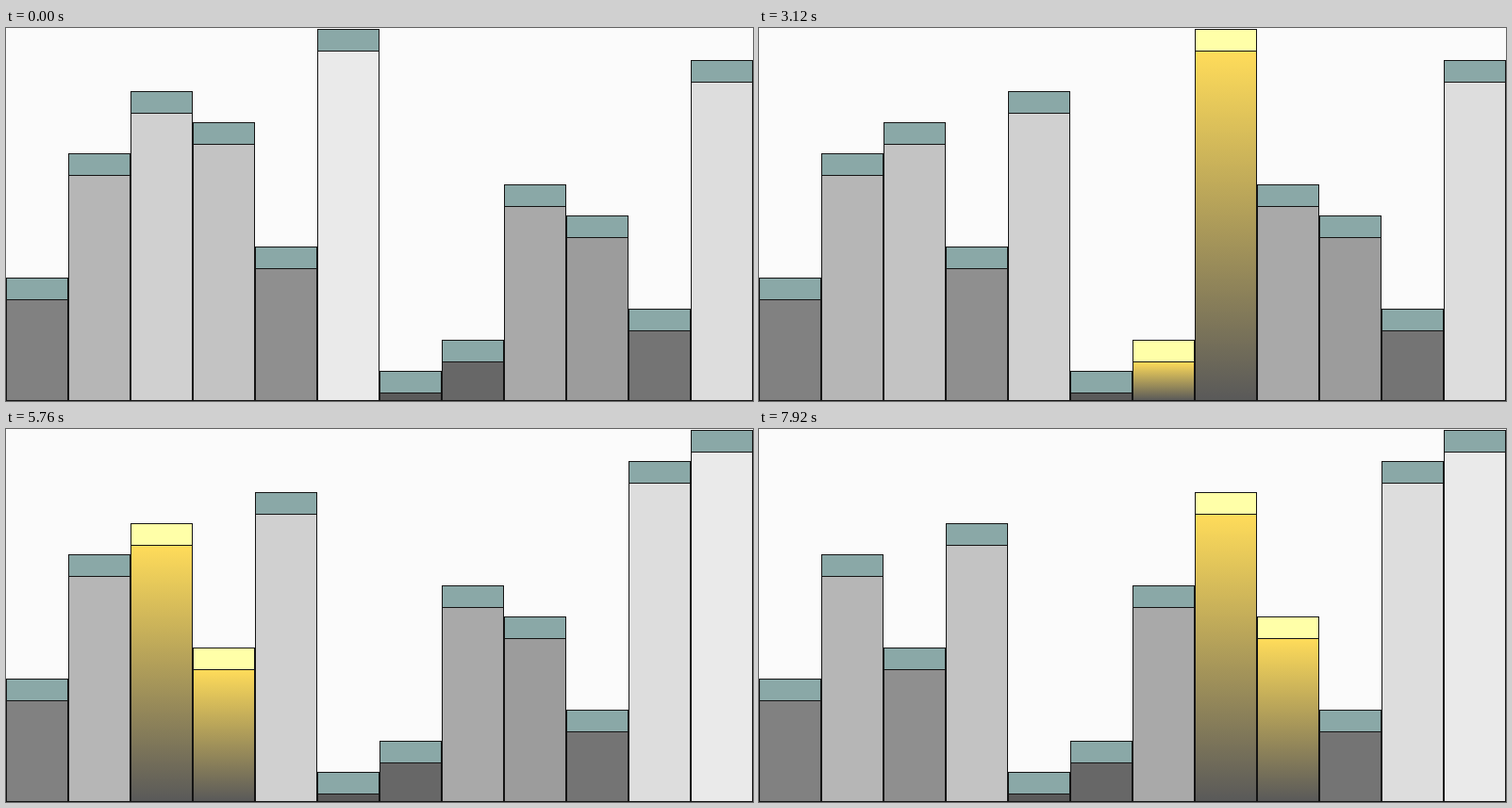
An HTML page for the animation above (8 s loop, 792 px wide and 396 px high).

```html
<!DOCTYPE html>
<html lang="en">
<head>
<meta charset="utf-8">
<title>Bubble sort</title>
<style>
  html, body { margin: 0; width: 100%; height: 100%; overflow: hidden; background: #fbfbfb; }
  svg { display: block; width: 792px; height: 396px; }
  rect { stroke: #141414; stroke-width: 1; }
</style>
</head>
<body>
<svg id="stage" viewBox="0 0 792 396">
  <defs>
    <linearGradient id="glow" x1="0" y1="0" x2="0" y2="1">
      <stop offset="0" stop-color="#ffdc5a"/>
      <stop offset="1" stop-color="#595959"/>
    </linearGradient>
  </defs>
</svg>
<script>
const LOOP = 8000, HOLD = 600, BEAT = 240;
const SLOT = 66, UNIT = 33, CAP = 23, FLOOR = 395;
const start = [4, 8, 10, 9, 5, 12, 1, 2, 7, 6, 3, 11];
const stage = document.getElementById('stage');

function addRect() {
  const el = document.createElementNS('http://www.w3.org/2000/svg', 'rect');
  el.setAttribute('width', SLOT - 1);
  return stage.appendChild(el);
}

function set(el, attrs) {
  for (const key in attrs) el.setAttribute(key, attrs[key]);
}

// One beat per comparison, a second one after each swap.
function bubbleSort(list) {
  const beats = [];
  const bars = list.slice();
  for (let end = bars.length - 1; end > 0; end--) {
    for (let i = 0; i < end; i++) {
      beats.push({ bars: bars.slice(), pair: i });
      if (bars[i] > bars[i + 1]) {
        [bars[i], bars[i + 1]] = [bars[i + 1], bars[i]];
        beats.push({ bars: bars.slice(), pair: i });
      }
    }
  }
  return beats;
}

const idle = { bars: start, pair: -2 };
const beats = bubbleSort(start);
const views = start.map(() => ({ body: addRect(), cap: addRect() }));

function grey(value) {
  const c = Math.round(77 + 13.1 * value);
  return `rgb(${c},${c},${c})`;
}

function draw({ bars, pair }) {
  bars.forEach((value, i) => {
    const lit = i === pair || i === pair + 1;
    const x = i * SLOT + 0.5;
    const top = FLOOR + 2 - value * UNIT;
    set(views[i].body, {
      x, y: top + CAP + 0.5, height: FLOOR - top - CAP,
      fill: lit ? 'url(#glow)' : grey(value)
    });
    set(views[i].cap, {
      x, y: top + 0.5, height: CAP,
      fill: lit ? '#ffffa8' : '#8aa8a7'
    });
  });
}

let shown = null;
function render(now) {
  const t = now % LOOP;
  const state = t < HOLD ? idle : beats[Math.floor((t - HOLD) / BEAT)];
  if (state !== shown) draw(shown = state);
}

const t0 = performance.now();
function tick() {
  render(performance.now() - t0);
  requestAnimationFrame(tick);
}
tick();
</script>
</body>
</html>
```
